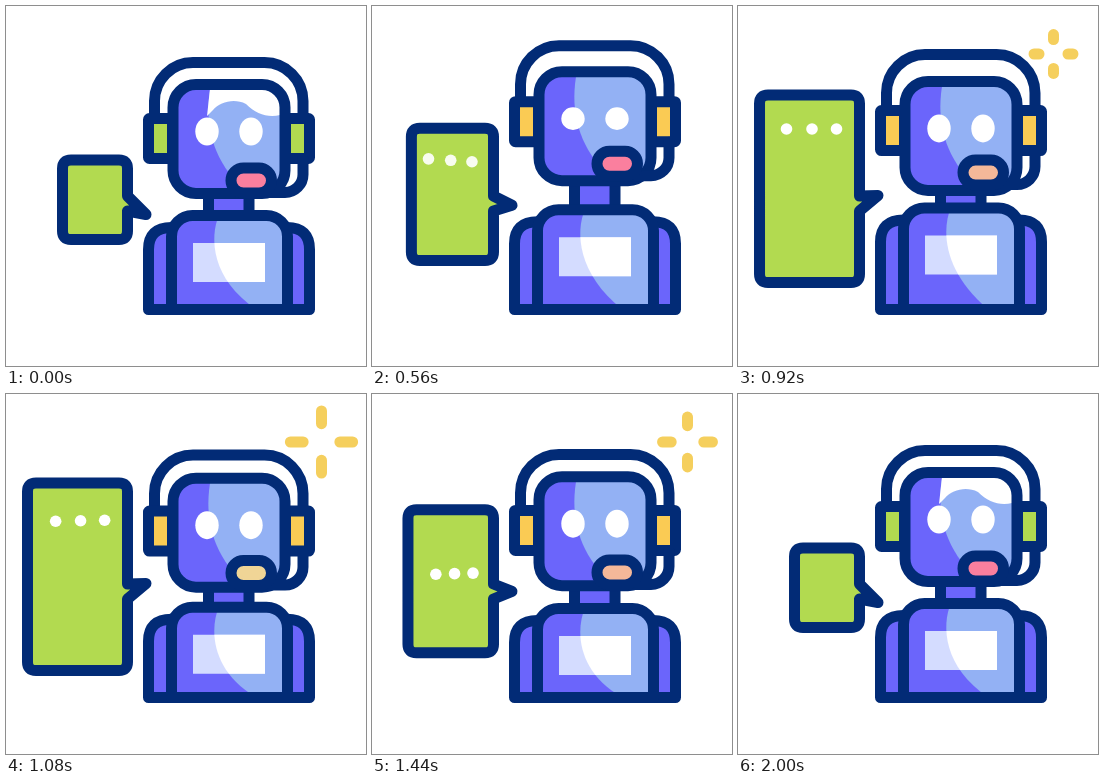
Recreate the animation shown at these times as an HTML page with a canvas. Size 360 by 360 pixels, loop 3000 ms.

```html
<!DOCTYPE html>
<html lang="en">
<head>
<meta charset="utf-8">
<title>Talking robot</title>
<style>
  html, body { margin: 0; width: 100%; height: 100%; overflow: hidden; background: #fff; }
  canvas { display: block; width: 360px; height: 360px; }
</style>
</head>
<body>
<canvas id="stage" width="360" height="360"></canvas>
<script>
const ctx = document.getElementById('stage').getContext('2d');
const LOOP = 3000, STEP = 40;
const NAVY = '#022b76', PURPLE = '#6b65fb', BLUE = '#93b1f4', LAVENDER = '#d4dcff', SPARK = '#f5cf5d', LIME = '#b2da50';
const GREEN = [178, 218, 80], YELLOW = [250, 203, 84], PINK = [250, 127, 158], CREAM = [240, 217, 150];

// Piecewise cosine easing through [time, value] keys.
function track(t, ...keys) {
  if (t <= keys[0][0]) return keys[0][1];
  for (let i = 1; i < keys.length; i++) {
    const [t0, v0] = keys[i - 1], [t1, v1] = keys[i];
    if (t < t1) return v0 + (v1 - v0) * (1 - Math.cos(Math.PI * (t - t0) / (t1 - t0))) / 2;
  }
  return keys[keys.length - 1][1];
}

const pulse = (t, a, b, c, d) => track(t, [a, 0], [b, 1], [c, 1], [d, 0]);
const mix = (a, b, k) => `rgb(${a.map((v, i) => Math.round(v + (b[i] - v) * k))})`;

function paint(path, fill, stroke) {
  if (fill) { ctx.fillStyle = fill; ctx.fill(path); }
  if (stroke) { ctx.strokeStyle = stroke; ctx.stroke(path); }
}

function box(x, y, w, h, r) {
  const path = new Path2D();
  path.roundRect(x, y, w, h, r);
  return path;
}

function ellipse(x, y, rx, ry) {
  const path = new Path2D();
  path.ellipse(x, y, rx, ry, 0, 0, 2 * Math.PI);
  return path;
}

function shifted(dy, draw) {
  ctx.save();
  ctx.translate(0, dy);
  draw();
  ctx.restore();
}

function drawBody(dy, headDy) {
  paint(box(202.5, 182 + headDy, 40.5, 35 + dy - headDy, 0), PURPLE, NAVY);

  const top = 221.5 + dy;
  paint(new Path2D(`M142.5 303.5V${top + 22}Q142.5 ${top} 165.5 ${top}H281Q303.5 ${top} 303.5 ${top + 22}V303.5Z`), PURPLE, NAVY);

  const torso = box(165.5, 209.5 + dy, 116, 94 - dy, [21, 21, 0, 0]);
  const shine = new Path2D(`M213 ${209 + dy}C203 ${232 + dy} 206 ${274 + dy} 250 303H282V${209 + dy}Z`);
  const panel = box(187, 237 + dy, 72, 39, 0);
  paint(torso, PURPLE);
  ctx.save();
  ctx.clip(torso);
  paint(shine, BLUE);
  paint(panel, LAVENDER);
  ctx.clip(shine);
  paint(panel, '#fff');
  ctx.restore();
  paint(torso, null, NAVY);
}

function drawBandAndEars(earColor) {
  paint(new Path2D('M148.5 112V95a38.5 38.5 0 0 1 38.5-38.5H258.5a38.5 38.5 0 0 1 38.5 38.5V112'), null, NAVY);
  for (const x of [142.5, 279.5]) paint(box(x, 112.5, 24, 40, 1), earColor, NAVY);
}

function drawHead(eyeOpen, glare) {
  const head = box(167, 78.5, 112, 109, 23);
  paint(head, PURPLE);
  ctx.save();
  ctx.clip(head);
  paint(new Path2D('M205 78C199 108 200 152 243 188H280V78Z'), BLUE);
  if (glare) paint(new Path2D('M204 83H262Q274 88 274 97V109C262 112 250 108 240 98C228 92 214 96 207 104L201 110Z'), '#fff');
  ctx.restore();
  paint(head, null, NAVY);
  for (const x of [201, 245]) paint(ellipse(x, 125.5, 11.7, 14 * eyeOpen), '#fff');
}

function drawMic(color) {
  paint(new Path2D('M297 153V168.500a18 18 0 0 1-18 18H255'), null, NAVY);
  paint(box(225, 162, 40.5, 25, 12.5), color, NAVY);
}

function drawBubble(grow) {
  const left = 56.5 - 35 * grow, top = 154 - 65 * grow, bottom = 233.5 + 43 * grow;
  const tip = 208.5 - 19 * grow, right = 121.5, r = 8.5;
  const bubble = new Path2D(`M${left + r} ${top}H${right - r}q${r} 0 ${r} ${r}V190L140 ${tip}L${right} 205`
    + `V${bottom - r}q0 ${r} ${-r} ${r}H${left + r}q${-r} 0 ${-r} ${-r}V${top + r}q0 ${-r} ${r} ${-r}Z`);
  paint(bubble, LIME, NAVY);
}

function drawDots(t) {
  ctx.globalAlpha = pulse(t, 310, 620, 1700, 1880);
  [[72.5, 24], [87.5, 13.5], [102.5, 4]].forEach(([x, spread], i) => {
    const lag = i * 8;
    const rise = pulse(t - lag, 110, 850, 968, 1768 - lag);
    paint(ellipse(x - spread * rise, 212.5 - 89.5 * rise, 5.8, 5.8), '#fff');
  });
  ctx.globalAlpha = 1;
}

function drawSparkle(t) {
  const k = pulse(t, 780, 1110, 1310, 1640);
  if (!k) return;
  const inner = 12 + 6.5 * k, outer = inner + 13 * k;
  ctx.save();
  ctx.translate(315.5, 48);
  ctx.globalAlpha = Math.min(1, k * 4);
  for (let i = 0; i < 4; i++) {
    ctx.rotate(Math.PI / 2);
    paint(new Path2D(`M${inner} 0H${outer}`), null, SPARK);
  }
  ctx.restore();
}

function render(t) {
  const phoneDy = track(t, [200, 0], [700, -20.5], [1160, 6.5], [1800, 0]);
  const headDy = track(t, [200, 0], [660, -14.5], [1160, 7], [1800, 0]);
  const bodyDy = track(t, [360, 0], [780, -12.5], [1200, 7.5], [1800, 0]);
  const eyeOpen = track(t, [480, 1], [660, 0.53], [840, 1]);
  const earColor = mix(GREEN, YELLOW, pulse(t, 200, 500, 1440, 1840));
  const micColor = mix(PINK, CREAM, pulse(t, 580, 1160, 1240, 1720));

  ctx.fillStyle = '#fff';
  ctx.fillRect(0, 0, 360, 360);
  ctx.lineWidth = 11;
  ctx.lineJoin = ctx.lineCap = 'round';

  drawBody(bodyDy, headDy);
  shifted(phoneDy, () => drawBandAndEars(earColor));
  shifted(headDy, () => drawHead(eyeOpen, t < 280 || t >= 1600));
  shifted(phoneDy, () => drawMic(micColor));
  drawBubble(pulse(t, 200, 930, 1120, 1840));
  drawDots(t);
  drawSparkle(t);
}

const start = performance.now();
function tick() {
  const t = (performance.now() - start) % LOOP;
  render(Math.floor(t / STEP) * STEP);
  requestAnimationFrame(tick);
}
tick();
</script>
</body>
</html>
```
